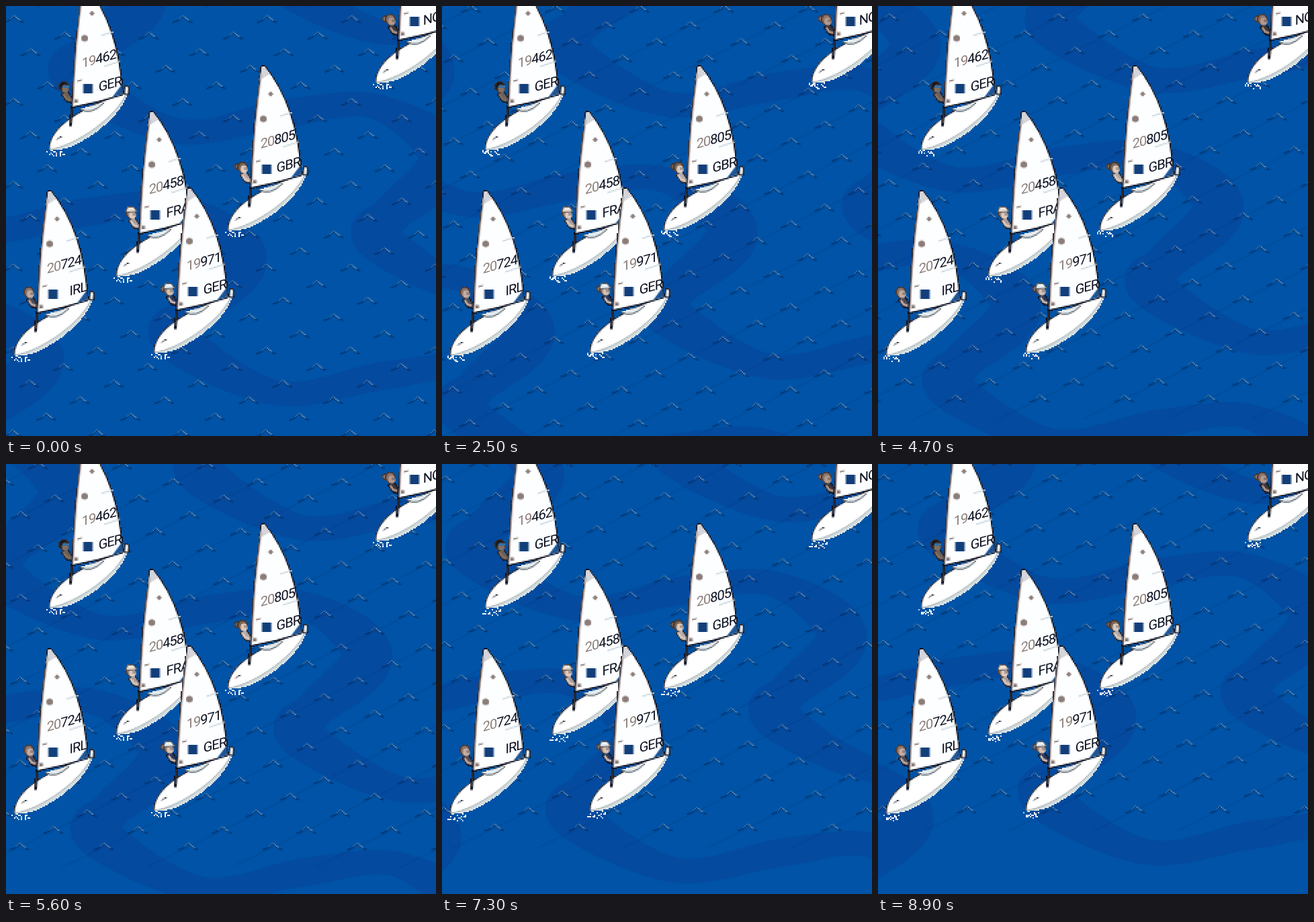
An HTML page with a canvas for the animation above (9100 ms loop, 640 px wide and 640 px high).

```html
<!DOCTYPE html>
<html>
<head>
<meta charset="utf-8">
<style>
  html, body { margin: 0; width: 100%; height: 100%; overflow: hidden; background: #0053a6; }
  canvas { display: block; }
</style>
</head>
<body>
<canvas id="stage" width="640" height="640"></canvas>
<script>
const LOOP = 9100, STEPS = 89;
const DRIFT = { x: 302, y: -148 };    // sea travel in one loop
const INK = '#0b1020', TAUPE = '#8b7d79', BATTEN = '#b9cbd6';

function layer(w, h) {
  const g = Object.assign(document.createElement('canvas'), { width: w, height: h }).getContext('2d');
  g.imageSmoothingEnabled = false;
  return g;
}

const stage = document.getElementById('stage').getContext('2d');
stage.imageSmoothingEnabled = false;
const sea = layer(320, 320);
const fleet = layer(640, 640);

function paint(g, path, fill, stroke, width = 2) {
  const p = typeof path === 'string' ? new Path2D(path) : path;
  if (fill) { g.fillStyle = fill; g.fill(p); }
  if (stroke) { g.strokeStyle = stroke; g.lineWidth = width; g.stroke(p); }
}

function disc(g, x, y, rx, ry, fill, stroke) {
  const p = new Path2D();
  p.ellipse(x, y, rx, ry, 0, 0, 7);
  paint(g, p, fill, stroke);
}

function box(g, x, y, w, h, fill) {
  g.fillStyle = fill;
  g.fillRect(x, y, w, h);
}

// ---------- sea ----------
// One period of the winding current: x, y, half width.
const BEND = [451, 242, 0];
const bends = [[34, -8, 33], [185, 71, 19], [345, 45, 21], [480, 35, 19], [583, 112, 37], [504, 195, 29]];

function bendAt(i) {
  const turn = Math.floor(i / bends.length);
  return bends[i - turn * bends.length].map((v, d) => v + turn * BEND[d]);
}

function spline(u) {
  const i = Math.floor(u), t = u - i;
  const [a, b, c, d] = [-1, 0, 1, 2].map(k => bendAt(i + k));
  return b.map((v, k) => v + t / 2 * (c[k] - a[k]
    + t * (2 * a[k] - 5 * v + 4 * c[k] - d[k] + t * (3 * (v - c[k]) + d[k] - a[k]))));
}

const current = new Path2D();
for (let u = -12; u < 12; u += .03) {
  const [x, y, r] = spline(u);
  current.moveTo(x + r, y);
  current.arc(x, y, r, 0, 2 * Math.PI);
}

// A ripple is a cusp; its lit part is a stretch of the same curve, a little higher.
function cusp(from, to, lift) {
  const p = new Path2D();
  for (let x = from; x <= to; x++) p.lineTo(x, 6 - lift - 11 * Math.exp(-Math.abs(x) / 8));
  return p;
}
const crest = cusp(-15, 14, 0), litLeft = cusp(-6, 0, 1.5), litRight = cusp(1, 9, 1.5);

function drawSea(n) {
  const g = sea, dx = n / STEPS * DRIFT.x, dy = n / STEPS * DRIFT.y;
  g.setTransform(.5, 0, 0, .5, 0, 0);
  box(g, 0, 0, 640, 640, '#0053a6');
  for (let k = -4; k <= 3; k++) {
    g.save();
    g.translate(521 + dx + k * DRIFT.x, 357 + dy + k * DRIFT.y);
    paint(g, current, '#044a9f');
    g.restore();
  }
  const sx = DRIFT.x / 6, sy = DRIFT.y / 6, gap = 125.6;
  const wake = Math.min(1, n / 15);
  for (let row = -2; row < 33; row++) {
    const y = 612 + row * sy + dy;
    const x0 = 60 + row * sx + dx;
    for (let x = x0 - Math.ceil(x0 / gap) * gap; x < 700; x += gap) {
      g.save();
      g.translate(x, y);
      paint(g, `M-12 6l${-sx * wake} ${-sy * wake}`, null, '#00347466', 1);
      paint(g, crest, null, '#052a5c', 1.8);
      paint(g, litLeft, null, '#4d84b8', 1.4);
      paint(g, litRight, null, '#9fc2de', 1.4);
      g.restore();
    }
  }
}

// ---------- boats ----------
const boats = [
  { x: 96, y: 178, no: '19462', land: 'GER', hair: '#15151c', skin: '#84705f', vest: '#6a5f5b', shades: true },
  { x: 582, y: 78, no: '', land: 'NOR', hair: '#8d7468', skin: '#b39a8d', vest: '#39343a', tail: true },
  { x: 362, y: 298, no: '20805', land: 'GBR', hair: '#76604f', skin: '#dfcabd', vest: '#b4acaa', tail: true },
  { x: 196, y: 366, no: '20458', land: 'FRA', hair: '#8d7f78', skin: '#dfcabd', vest: '#a89c9b', cap: '#eee5d8' },
  { x: 252, y: 480, no: '19971', land: 'GER', hair: '#8d7a70', skin: '#d6c0b2', vest: '#27385c', cap: '#e8f4fa', tail: true },
  { x: 44, y: 484, no: '20724', land: 'IRL', hair: '#8d7468', skin: '#c4aca0', vest: '#4b4a58' }
];

function drawSailor(g, b) {
  paint(g, 'M-14-47L-5-52L3-40V-34L-6-36Z', b.vest, INK, 1.5);
  if (b.tail) disc(g, -18, -59, 4, 4, b.hair, '#3b3033');
  disc(g, -10, -58, 7, 8, b.hair, '#3b3033');
  disc(g, -8, -55, 5, 6, b.skin);
  if (b.cap) paint(g, 'M-18-59L-15-67H-6L-1-60Z', b.cap, '#4a4548', 1.5);
  if (b.shades) box(g, -12, -60, 10, 4, '#3a6f9e');
  else box(g, -7, -57, 2, 2, INK);
  paint(g, 'M-10-46L-6-40L0-38', null, b.skin, 3);
}

function drawHull(g) {
  paint(g, 'M-32 36C-32 0 20-28 84-50C84-20 10 42-32 36Z', '#fff');
  paint(g, 'M84-50C84-20 10 42-32 36C10 30 72-16 84-50Z', '#d3dddf');
  paint(g, 'M-32 36C10 30 72-16 84-50', null, '#8f9a9e', 1.2);
  paint(g, 'M-32 36C-32 0 20-28 84-50', null, INK, 1.6);
  paint(g, 'M80-47L81-59L87-58L86-46Z', '#eef3f4', INK, 1.6);
  paint(g, 'M-20 21L-16 17H-13', null, INK, 1.6);
  paint(g, 'M14-25Q30-14 50-34', '#e6edf0', '#39444e', 1.6);
}

function drawSail(g) {
  paint(g, 'M18-209H23Q72-150 78-46Q40-34 2-27Q5-120 18-209Z', '#fdfeff', INK);
  paint(g, 'M19-207H23L31-197L15-187Z', '#d4d4da');
  paint(g, 'M18-196Q7-120 4-32', null, '#b09a93', 1.6);
  paint(g, 'M62-42L77-62V-47Z', '#1d5596');
  paint(g, 'M46-134L64-140M50-88L74-96', null, BATTEN, 1.5);
  paint(g, 'M10-66L17-68', null, TAUPE);
  paint(g, 'M32-171l4 4l-4 4l-4-4Z', TAUPE);
  disc(g, 21, -130, 5, 5, TAUPE);
  box(g, 19, -62, 14, 14, '#123f7a');
  box(g, 6, -39, 5, 5, TAUPE);
  paint(g, 'M2-28L0 1', null, INK, 4);
  paint(g, 'M2-26L1-4', null, '#6d6660', 1);
}

function drawText(g, b) {
  const write = (text, x, y, color) => {
    g.setTransform(1, -.28, 0, 1, b.x, b.y);
    g.fillStyle = color;
    g.fillText(text, x, y + .28 * x);
    return g.measureText(text).width;
  };
  g.font = '20px Roboto, sans-serif';
  g.letterSpacing = '-1px';
  g.textAlign = 'right';
  write(b.land, 76, -60, INK);
  const width = write(b.no.slice(2), 68, -100, INK);
  write(b.no.slice(0, 2), 68 - width, -100 + .28 * width, TAUPE);
  g.resetTransform();
}

// Shapes are drawn at half size with hard edges, then doubled.
function drawBoat(b) {
  const g = layer(80, 140);
  g.setTransform(.5, 0, 0, .5, 25, 110);
  drawHull(g);
  drawSailor(g, b);
  drawSail(g);
  const img = g.getImageData(0, 0, 80, 140);
  for (let i = 3; i < img.data.length; i += 4) img.data[i] = img.data[i] > 110 ? 255 : 0;
  g.putImageData(img, 0, 0);
  fleet.drawImage(g.canvas, b.x - 50, b.y - 220, 160, 280);
  drawText(fleet, b);
}
boats.forEach(drawBoat);

function random(seed) {
  const v = Math.sin(seed * 127.1) * 43758.5453;
  return v - Math.floor(v);
}

function drawFoam(b, n) {
  const phase = n % 5;
  for (let i = 0; i < 20; i++) {
    const a = random(i + phase * 31 + 1), d = random(i * 3 + phase * 17 + 5);
    const x = b.x - 36 + a * 28, y = b.y + 36 + d * 9 + 2 * Math.sin(a * 3);
    box(stage, x & ~1, y & ~1, 2, 2, i % 4 ? '#f4fbff' : '#b5d2e6');
  }
}

// Two pictures stay for 200 ms, all others for 100 ms.
function stepAt(t) {
  const slot = Math.floor(t / 100);
  return Math.min(STEPS - 1, slot - (slot >= 15));
}

const start = performance.now();
let shown = -1;
function tick() {
  const n = stepAt((performance.now() - start) % LOOP);
  if (n !== shown) {
    shown = n;
    drawSea(n);
    stage.drawImage(sea.canvas, 0, 0, 640, 640);
    stage.drawImage(fleet.canvas, 0, 0);
    boats.forEach(b => drawFoam(b, n));
  }
  requestAnimationFrame(tick);
}
tick();
</script>
</body>
</html>
```
